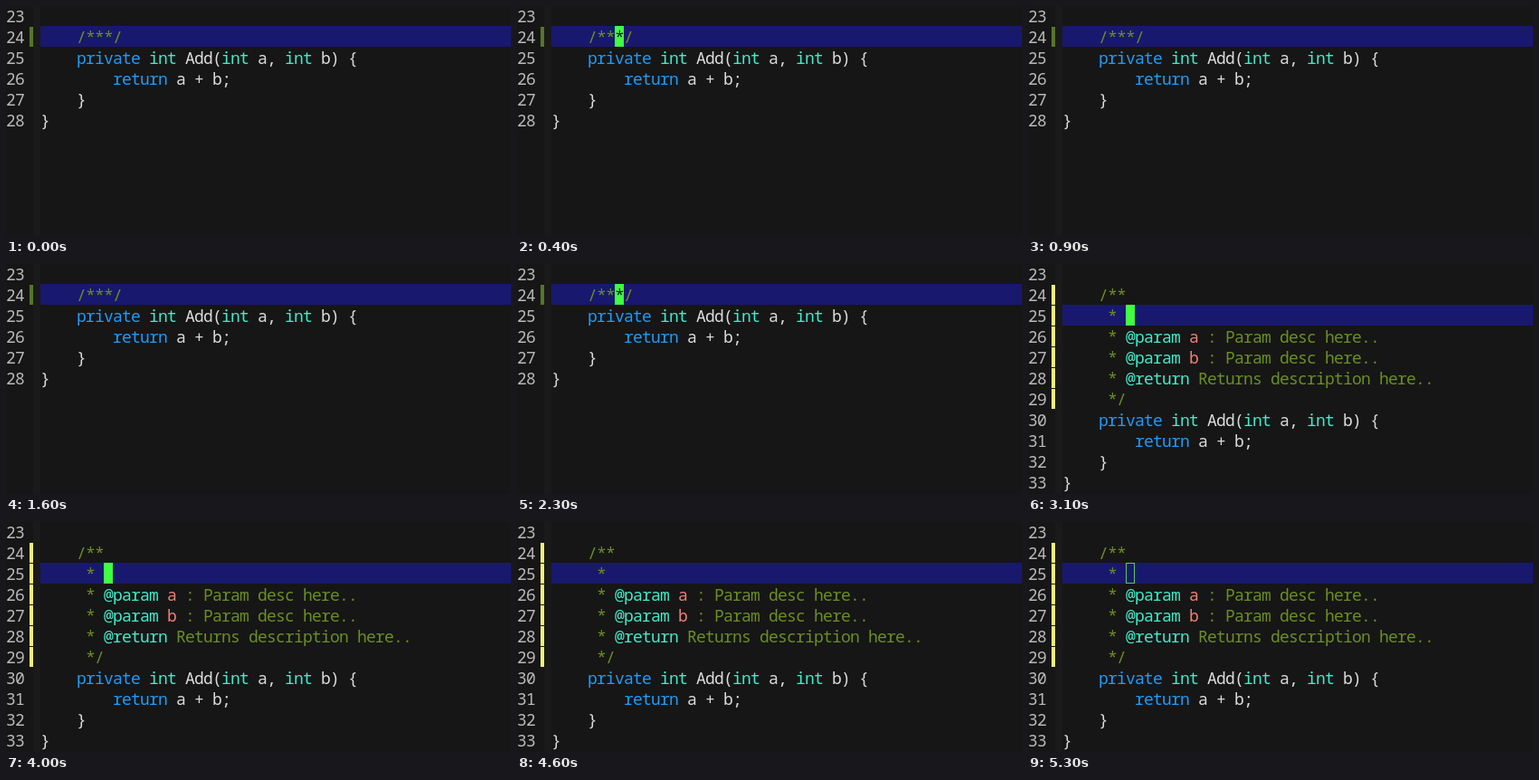
An HTML page for the animation above (5.4 s loop, 558 by 254 pixels).

```html
<!DOCTYPE html>
<html lang="en">
<head>
<meta charset="utf-8">
<style>
  html, body { margin: 0; width: 558px; height: 254px; overflow: hidden; background: #161616; }
  div, pre { position: absolute; margin: 0; }
  pre {
    top: 0; left: 38px; color: #dcdcdc;
    font: 18px/23px "Noto Sans Mono", monospace;
    letter-spacing: calc(10px - 1ch);
    font-variant-ligatures: none;
  }
  #numbers { left: 0; color: #b9b9b9; }
  #fringe { left: 30px; width: 8px; height: 254px; background: #1a1a1a; }
  #line { left: 38px; width: 520px; height: 23px; background: #18186e; }
  #marks { left: 26px; top: 22px; width: 4px; }
  #cursor { left: 108px; width: 10px; height: 23px; box-sizing: border-box; background: #40ff40; }
  #cursor.hollow { background: none; border: 1px solid #4dd058; }
  .keyword { color: #1e9cfa; }
  .type { color: #40ecca; }
  .keyword, .type { font-weight: 500; }
  .comment { color: #6b8e23; }
  .name { color: #f08072; font-weight: 400; }
</style>
</head>
<body>
<div id="fringe"></div>
<div id="line"></div>
<div id="marks"></div>
<div id="cursor"></div>
<pre id="numbers"></pre>
<pre id="code"></pre>
<script>
const LOOP = 5400, EXPAND = 3100, BLUR = 5200, ROW = 23;
const [line, marks, cursor, numbers, code] =
  ['line', 'marks', 'cursor', 'numbers', 'code'].map(id => document.getElementById(id));

const span = (kind, text) => `<span class="${kind}">${text}</span>`;
const type = text => span('type', text);
const param = name =>
  `     * ${type('@param')} ${span('name', name)} : Param desc here..`;

const method = [
  `    ${span('keyword', 'private')} ${type('int')} Add(${type('int')} a, ${type('int')} b) {`,
  `        ${span('keyword', 'return')} a + b;`,
  '    }',
  '}'
];
const stub = ['', span('comment', '    /**<span id="under">*</span>/'), ...method];
const documented = [
  '',
  span('comment', ['    /**', '     * ', param('a'), param('b'),
    `     * ${type('@return')} Returns description here..`, '     */'].join('\n')),
  ...method
];

let shown;
function show(expanded) {
  if (shown === expanded) return;
  shown = expanded;
  code.innerHTML = (expanded ? documented : stub).join('\n');
  numbers.textContent = Array.from({ length: expanded ? 11 : 6 }, (_, i) => 23 + i).join('\n');
  line.style.top = cursor.style.top = (expanded ? 2 : 1) * ROW - 1 + 'px';
  // Changed lines are marked with bars one pixel shorter than the row
  const color = expanded ? '#f0f07c' : '#55752a';
  marks.style.height = (expanded ? 6 : 1) * ROW + 'px';
  marks.style.background =
    `repeating-linear-gradient(transparent 0 1px, ${color} 1px ${ROW}px)`;
}

function frame(now) {
  const t = now % LOOP;
  const expanded = t >= EXPAND;
  show(expanded);
  const waiting = t < 100 || (t >= 3000 && !expanded);
  const on = !waiting && t % 1000 < 600;
  cursor.style.visibility = on ? 'visible' : 'hidden';
  cursor.classList.toggle('hollow', t >= BLUR);
  const under = document.getElementById('under');
  if (under) under.style.color = on ? '#161616' : '';
  requestAnimationFrame(frame);
}
frame(performance.now());
</script>
</body>
</html>
```
